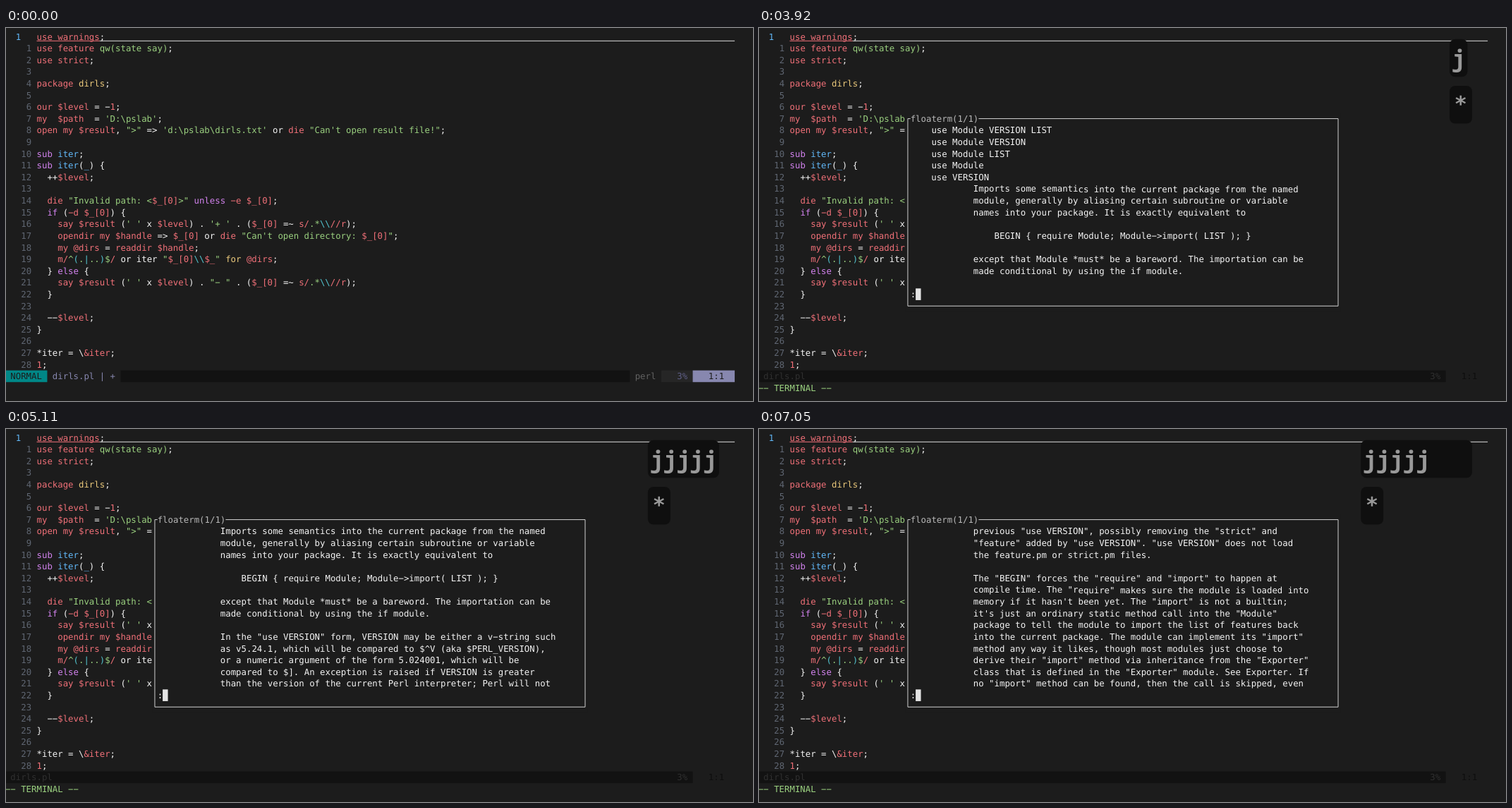
Animation, 1059 px wide and 529 px high, one loop 8000 ms. Source, as an HTML page:

```html
<!DOCTYPE html>
<html lang="en">
<head>
<meta charset="utf-8">
<title>Editor with floating terminal</title>
<style>
  html, body { margin: 0; width: 100%; height: 100%; overflow: hidden; background: #1c1c1c; }
  svg { display: block; width: 1059px; height: 529px; }
  /* The imperceptible turn keeps baselines from snapping to whole pixels */
  text { font-family: "DejaVu Sans Mono", monospace; font-size: 12.358px; white-space: pre; text-rendering: geometricPrecision; transform: rotate(.002deg); }
  .key { font-weight: bold; fill: #999; }
  .run { font-family: "Noto Sans Mono", monospace; font-size: 33px; letter-spacing: -.9px; }
  .star { font-size: 30px; text-anchor: middle; }
</style>
</head>
<body>
<svg id="stage" viewBox="0 0 1059 529"></svg>
<script>
const LOOP = 8000, CELL = 7.44, ROW = 16.607;
const X = col => -1.1 + col * CELL;
const Y = row => 4 + row * ROW;
const COLORS = {
  w: '#f4f4f4', r: '#f07078', g: '#9ad07f', y: '#ecca7c', p: '#d282ee', b: '#61b8f8', c: '#53c5d0'
};

// "§x" switches to colour x
const CODE = String.raw`§ruse warnings§w;
§ruse feature §gqw(state say)§w;
§ruse strict§w;

§rpackage §ydirls§w;

§rour $level §w= -§r1§w;
§rmy  $path  §w= §g'D:\pslab'§w;
§ropen my $result§w, §g">" §w=> §g'd:\pslab\dirls.txt' §wor §rdie §g"Can't open result file!"§w;

§psub §biter§w;
§psub §biter§w(§b_§w) {
  ++§r$level§w;

  §rdie §g"Invalid path: <§r$_[0]§g>" §punless §r-e $_[0]§w;
  §pif §w(§r-d $_[0]§w) {
    §rsay $result §w(§g' ' §wx §r$level§w) . §g'+ ' §w. (§r$_[0] §w=~ §rs/§g.*§c\\§r//r§w);
    §ropendir my $handle §w=> §r$_[0] §wor §rdie §g"Can't open directory: §r$_[0]§g"§w;
    §rmy @dirs §w= §rreaddir $handle§w;
    §rm/§g^§c(§g.§c|§g..§c)§g$§r/ §wor iter §g"§r$_[0]§c\\§r$_§g" §yfor §r@dirs§w;
  } §pelse §w{
    §rsay $result §w(§g' ' §wx §r$level§w) . §g"- " §w. (§r$_[0] §w=~ §rs/§g.*§c\\§r//r§w);
  }

  --§r$level§w;
}

*iter = \§r&iter§w;
§r1§w;`.split('\n');

const DOC = String.raw`    use Module VERSION LIST
    use Module VERSION
    use Module LIST
    use Module
    use VERSION
            Imports some semantics into the current package from the named
            module, generally by aliasing certain subroutine or variable
            names into your package. It is exactly equivalent to

                BEGIN { require Module; Module->import( LIST ); }

            except that Module *must* be a bareword. The importation can be
            made conditional by using the if module.

            In the "use VERSION" form, VERSION may be either a v-string such
            as v5.24.1, which will be compared to $^V (aka $PERL_VERSION),
            or a numeric argument of the form 5.024001, which will be
            compared to $]. An exception is raised if VERSION is greater
            than the version of the current Perl interpreter; Perl will not
            attempt to parse the rest of the file. Compare with "require",
            which can do a similar check at run time. Symmetrically, "no
            VERSION" allows you to specify that you want a version of Perl
            older than the specified one.

            Specifying VERSION as a numeric argument of the form 5.024001
            should generally be avoided as older less readable syntax
            compared to v5.24.1. Before perl 5.8.0 released in 2002 the more
            verbose numeric form was the only supported syntax, which is why
            you might see it in older code.

                use v5.24.1;    # compile time version check
                use 5.24.1;     # ditto
                use 5.024_001;  # ditto; older syntax compatible with perl 5.6

            This is often useful if you need to check the current Perl
            version before "use"ing library modules that won't work with
            older versions of Perl. (We try not to do this more than we have
            to.)

            "use VERSION" also lexically enables all features available in
            the requested version as defined by the feature pragma,
            disabling any features not in the requested version's feature
            bundle. See feature. Similarly, if the specified Perl version is
            greater than or equal to 5.12.0, strictures are enabled
            lexically as with "use strict". Any explicit use of "use strict"
            or "no strict" overrides "use VERSION", even if it comes before
            it. Later use of "use VERSION" will override all behavior of a
            previous "use VERSION", possibly removing the "strict" and
            "feature" added by "use VERSION". "use VERSION" does not load
            the feature.pm or strict.pm files.

            The "BEGIN" forces the "require" and "import" to happen at
            compile time. The "require" makes sure the module is loaded into
            memory if it hasn't been yet. The "import" is not a builtin;
            it's just an ordinary static method call into the "Module"
            package to tell the module to import the list of features back
            into the current package. The module can implement its "import"
            method any way it likes, though most modules just choose to
            derive their "import" method via inheritance from the "Exporter"
            class that is defined in the "Exporter" module. See Exporter. If
            no "import" method can be found, then the call is skipped, even`.split('\n');

// Each press is shown first; the pager reacts a moment later.
const PRESSES = [
  { at: 3920, delay: 70, key: 'j', lines: 1 },
  { at: 4150, delay: 40, key: 'j', lines: 1 },
  { at: 4450, delay: 70, key: 'j', lines: 1 },
  { at: 4710, delay: 70, key: 'j', lines: 1 },
  { at: 5040, delay: 70, key: 'j', lines: 1 },
  { at: 5520, delay: 70, key: ' ', lines: 14 },
  { at: 6220, delay: 70, key: ' ', lines: 14 },
  { at: 6980, delay: 70, key: ' ', lines: 14 }
];
const PAGE = 14;

function add(parent, tag, attrs = {}, content = '') {
  const node = document.createElementNS('http://www.w3.org/2000/svg', tag);
  setAttrs(node, attrs);
  node.textContent = content;
  return parent.appendChild(node);
}
function setAttrs(node, attrs) {
  for (const name in attrs) node.setAttribute(name, attrs[name]);
}
const show = (node, on) => node.setAttribute('visibility', on ? 'visible' : 'hidden');
// The terminal face draws a wide hyphen
const wide = s => s.replace(/-/g, '\u2212');

function write(parent, col, row, content, fill) {
  return add(parent, 'text', { x: X(col), y: Y(row) + 12.6, fill }, wide(content));
}
function block(parent, from, to, row, fill, rows = 1) {
  return add(parent, 'rect', {
    x: X(from), y: Y(row), width: (to - from) * CELL, height: ROW * rows, fill
  });
}
function writeColored(parent, col, row, source) {
  const line = write(parent, col, row, '', COLORS.w);
  source.split('§').forEach((part, i) => {
    if (i) add(line, 'tspan', { fill: COLORS[part[0]] }, wide(part.slice(1)));
    else if (part) add(line, 'tspan', {}, wide(part));
  });
}
function rule(parent, d, stroke) {
  add(parent, 'path', { d, stroke, fill: 'none' });
}

const stage = document.getElementById('stage');

// Editor
CODE.forEach((source, row) => {
  if (row) write(stage, row < 10 ? 4 : 3, row, String(row), '#5f6672');
  else write(stage, 2, 0, '1', COLORS.b);
  writeColored(stage, 6, row, source);
});
rule(stage, `M${X(6)} 18.3H${X(18)}`, COLORS.r);
rule(stage, `M${X(18)} 18.3H${X(139)}`, '#dcdcdc');
const editorCursor = block(stage, 6, 7, 0, '#e4e4e4');

// Status lines
const active = add(stage, 'g');
block(active, 0, 8, 29, '#008787');
block(active, 22, 119, 29, '#121212');
block(active, 125, 131, 29, '#262626');
block(active, 131, 139, 29, '#8787af');
write(active, 1, 29, 'NORMAL', '#1c1c1c');
write(active, 9, 29, 'dirls.pl | +', '#8787af');
write(active, 120, 29, 'perl', '#626262');
write(active, 128, 29, '3%', '#5f5f87');
write(active, 134, 29, '1:1', '#1c1c1c');

const inactive = add(stage, 'g');
block(inactive, 0, 131, 29, '#121212');
write(inactive, 1, 29, 'dirls.pl', '#303030');
write(inactive, 128, 29, '3%', '#303030');
write(inactive, 134, 29, '1:1', '#0e0e0e');
write(inactive, 0, 30, '-- TERMINAL --', COLORS.g);
const commandLine = write(stage, 0, 30, ':', COLORS.w);

// Floating terminal
const float = add(stage, 'g');
block(float, 28, 111, 7, '#1c1c1c', 17);
rule(float, `M${X(29)} ${Y(7.5)}H${X(28.5)}V${Y(23.5)}H${X(110.5)}V${Y(7.5)}H${X(42)}`, '#d0d0d0');
write(float, 29, 7, 'floaterm(1/1)', '#b8b8b8');
const docRows = Array.from({ length: PAGE }, (_, i) => write(float, 29, 8 + i, '', COLORS.w));
const prompt = write(float, 29, 22, ':', COLORS.w);
const floatCursor = block(float, 0, 1, 0, '#e4e4e4');

// Pressed keys
const keys = add(stage, 'g');
const makeKeyBox = () => add(keys, 'rect', { height: 53.5, rx: 8, fill: '#0f0f0f' });
const starBox = makeKeyBox(), runBox = makeKeyBox();
const star = add(keys, 'text', { class: 'key star' }, '*');
const run = add(keys, 'text', { class: 'key run', y: 55 });

function drawKeys(t) {
  const typed = PRESSES.filter(p => t >= p.at).map(p => p.key).join('');
  const runWidth = 6.6 + 18.9 * typed.length;
  const left = 1011 - Math.max(32, runWidth);
  const top = typed ? 82 : 16;
  setAttrs(starBox, { x: left, y: top, width: 32 });
  setAttrs(star, { x: left + 15.8, y: top + 35.5 });
  setAttrs(runBox, { x: left, y: 15.8, width: typed ? runWidth : 0 });
  setAttrs(run, { x: left + 3 });
  run.textContent = typed;
}

function drawPager(t) {
  const loaded = t >= 2710;
  const top = PRESSES.reduce((sum, p) => sum + (t >= p.at + p.delay ? p.lines : 0), 0);
  docRows.forEach((node, i) => { node.textContent = loaded ? wide(DOC[top + i] || '') : ''; });
  prompt.textContent = loaded ? ':' : '';
  setAttrs(floatCursor, { x: X(loaded ? 30 : 29), y: Y(loaded ? 22 : 8) });
}

function cursorOpacity(t) {
  if (t < 900 || t >= 2250) return 0;
  return t >= 2210 ? 0.55 : Math.min(1, (t - 860) / 310);
}

function render(t) {
  const open = t >= 2540;
  setAttrs(editorCursor, { opacity: cursorOpacity(t) });
  show(active, !open);
  show(inactive, open);
  show(float, open);
  show(commandLine, t >= 2250 && !open);
  show(keys, t >= 2250);
  drawKeys(t);
  drawPager(t);
}

const start = performance.now();
function tick() {
  render((performance.now() - start) % LOOP);
  requestAnimationFrame(tick);
}
tick();
</script>
</body>
</html>
```
